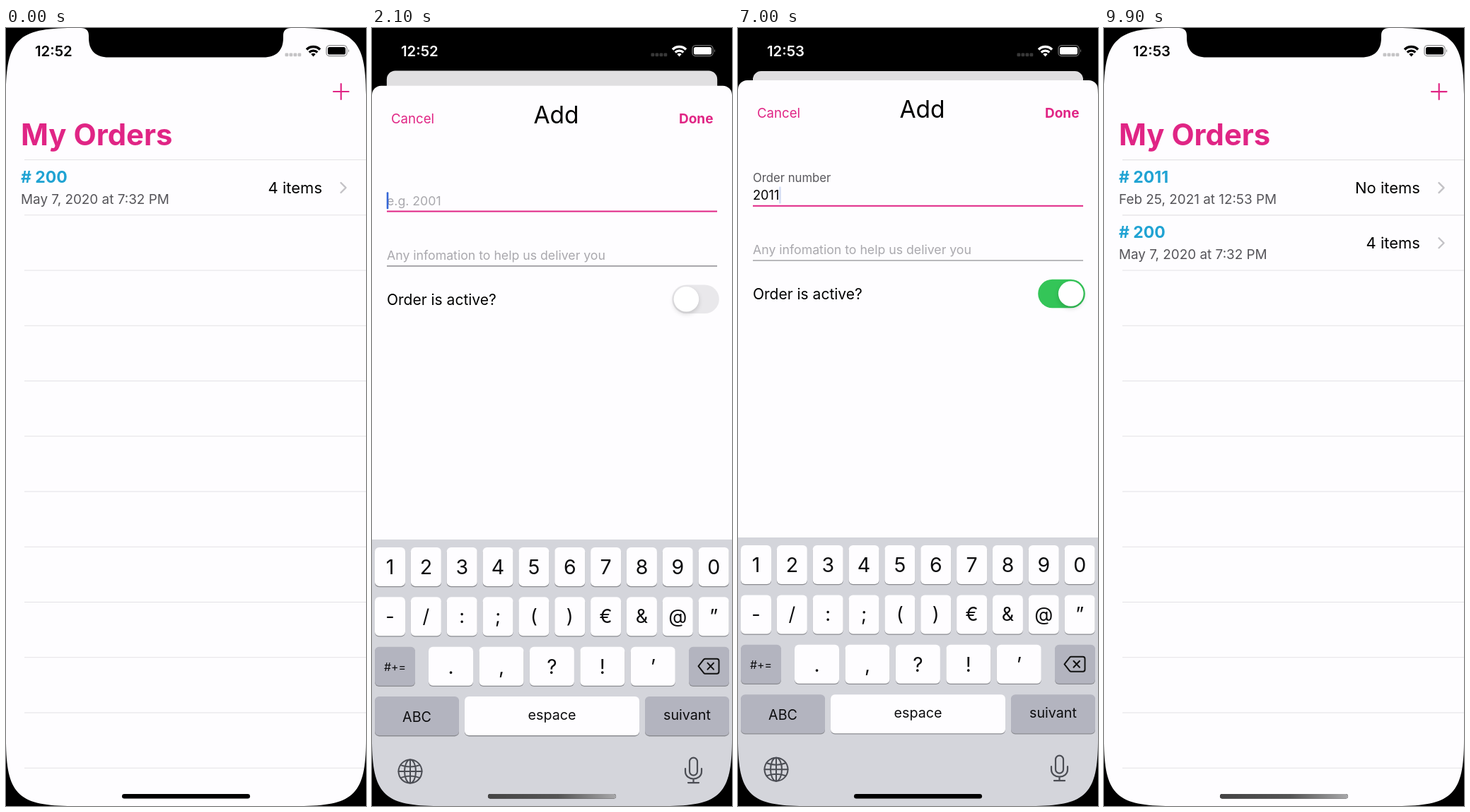
These frames come from a looping animation (509x1101 px, 9.95 s). An HTML page:

```html
<!DOCTYPE html>
<html lang="en">
<head>
<meta charset="utf-8">
<title>My Orders</title>
<style>
  html, body { margin: 0; width: 100%; height: 100%; overflow: hidden; background: #000; }
  svg { display: block; width: 100vw; height: 100vh; font-family: Inter, Roboto, sans-serif; }
  .mid { text-anchor: middle; }
  .end { text-anchor: end; }
  .pink { fill: #e02585; }
  .hint { fill: #a9a8ad; font-size: 17.7px; }
  .number { fill: #20a3d3; font-size: 23px; font-weight: 700; }
  .date { fill: #555459; font-size: 18.9px; }
  .line { fill: none; stroke-linecap: round; stroke-linejoin: round; }
  #thumb { filter: drop-shadow(0 3px 3px rgba(0, 0, 0, .16)); }
</style>
</head>
<body>
<svg viewBox="0 0 509 1101">
  <defs>
    <linearGradient id="fade"><stop stop-color="#444"/><stop offset=".55" stop-color="#555"/><stop offset="1" stop-color="#a8a8aa"/></linearGradient>
    <g id="globe" class="line" stroke="#4b4d54" stroke-width="2">
      <circle r="16.5"/><ellipse rx="8" ry="16.5"/>
      <path d="M0-16.5V16.5M-16.5 0H16.5M-13.5-9Q0-4 13.5-9M-13.5 9Q0 4 13.5 9"/>
    </g>
    <g id="mic" class="line" stroke="#4b4d54" stroke-width="2.2">
      <rect x="-5.5" y="-18.5" width="11" height="25" rx="5.5"/>
      <path d="M-11.5-3V1C-11.5 15 11.5 15 11.5 1V-3M0 11.5V17M-7.5 17H7.5"/>
    </g>
    <g id="delete" class="line" stroke="#111" stroke-width="2">
      <path d="M-5-10.5H11.5Q14.5-10.5 14.5-7.5V7.5Q14.5 10.5 11.5 10.5H-5Q-6 10.5-7 9.5L-14.5 0L-7-9.5Q-6-10.5-5-10.5ZM-1.5-4.500L7 4.500M7-4.500L-1.5 4.500"/>
    </g>
    <path id="shift" class="line" stroke="#111" stroke-width="2" d="M0-11L12 1H6V10H-6V1H-12Z"/>
  </defs>

  <rect width="509" height="1101"/>

  <g id="card">
    <rect id="page" width="509" height="1130" fill="#fefdff"/>
    <path id="plus" class="line" stroke-width="2.2" d="M463 90H484.500M473.700 79V101"/>
    <text class="pink" x="21" y="166" font-size="41.8" font-weight="700">My Orders</text>
    <path id="rules" stroke="#e3e2e5" stroke-width="1.2"/>
    <g id="newRow"></g>
    <g id="oldRow"></g>
    <rect id="scrim" width="509" height="1130"/>
  </g>

  <g id="sheet">
    <rect y="74" width="509" height="1100" rx="13" fill="#fefdff"/>
    <text class="pink" x="27" y="127" font-size="18.6">Cancel</text>
    <text class="mid" x="260.500" y="127" font-size="33.5">Add</text>
    <text id="done" class="pink end" x="482.500" y="127" font-size="19" font-weight="700">Done</text>
    <text id="label" x="21" y="218" font-size="16.7" fill="#58575c">Order number</text>
    <text id="example" class="hint" x="21" y="243">e.g. 2001</text>
    <text id="typed" x="21" y="243" font-size="18.2"></text>
    <g id="clear">
      <circle cx="470" cy="227.500" r="9.300" fill="#c6c5c9"/>
      <path class="line" stroke="#fff" stroke-width="1.8" d="M466.500 224L473.500 231M473.500 224L466.500 231"/>
    </g>
    <path id="underline1" d="M21 251.700H488"/>
    <text class="hint" x="21" y="320">Any infomation to help us deliver you</text>
    <path id="underline2" d="M21 329H488"/>
    <rect id="cursor" width="2.600" height="24" rx="1" fill="#3566d6"/>
    <text x="21" y="384" font-size="21">Order is active?</text>
    <rect id="track" x="424.200" y="355.800" width="66.600" height="40.400" rx="20.200"/>
    <rect id="thumb" y="358.200" height="35.600" rx="17.800" fill="#fff"/>
  </g>

  <g id="numeric"></g>
  <g id="letters"></g>

  <g id="status">
    <text id="clock" x="41" y="40" font-size="20.3" font-weight="600"></text>
    <g opacity=".22" id="signal"></g>
    <path d="M425 30.500A13.500 13.500 0 0 1 444 30.500" fill="none" stroke="currentColor" stroke-width="3.500"/>
    <path d="M428.700 34.500A8.300 8.300 0 0 1 440.300 34.500" fill="none" stroke="currentColor" stroke-width="3.200"/>
    <path d="M434.500 40.500L431.300 37A4.600 4.600 0 0 1 437.700 37Z"/>
    <rect x="453" y="24.700" width="29" height="15" rx="4.500" fill="none" stroke="currentColor" stroke-width="1.300" opacity=".45"/>
    <rect x="455" y="26.900" width="25" height="10.600" rx="2.600"/>
    <path d="M484 29.700Q486 32.200 484 34.800Z" opacity=".5"/>
  </g>

  <rect x="164" y="1084" width="181" height="6.500" rx="3.250"/>
  <rect id="homeFade" x="164" y="1084" width="181" height="6.500" rx="3.250" fill="url(#fade)"/>

  <path fill-rule="evenodd" d="M-2-2H511V1103H-2ZM0 94V1007C0 1084 17 1101 94 1101H415C492 1101 509 1084 509 1007V94C509 17 492 0 415 0H94C17 0 0 17 0 94Z"/>
  <path d="M106 0C114 0 117 4 117 11V14C117 32 127 41.500 145 41.500H364C382 41.500 392 32 392 14V11C392 4 395 0 403 0Z"/>
</svg>

<script>
const LOOP = 9950, STEP = 50, ROW = 78.25, PINK = [224, 37, 133];
const el = Object.fromEntries([...document.querySelectorAll('svg [id]')].map(n => [n.id, n]));

const clamp = v => Math.max(0, Math.min(1, v));
const ramp = (t, start, length) => clamp((t - start) / length);
const ease = v => v * v * (3 - 2 * v);
const mix = (a, b, k) => a + (b - a) * k;
const rgb = (a, b, k) => `rgb(${a.map((v, i) => Math.round(mix(v, b[i], k)))})`;
const set = (node, attrs) => { for (const k in attrs) node.setAttribute(k, attrs[k]); };
const move = (node, y) => set(node, { transform: `translate(0 ${y})` });
const show = (node, visible) => set(node, { visibility: visible ? 'visible' : 'hidden' });

// Critically damped spring from 0 to 1
const spring = ms => {
  const x = Math.max(0, ms) * 0.01826;
  return 1 - (1 + x) * Math.exp(-x);
};

// --- Static parts ---
const orderRow = (number, date, items) => `
  <text class="number" x="21" y="219"># ${number}</text>
  <text class="date" x="21" y="249">${date}</text>
  <text class="end" x="447" y="234" font-size="22">${items}</text>
  <path class="line" stroke="#c3c2c6" stroke-width="2.400" d="M473.500 219L480.500 226L473.500 233"/>`;

el.newRow.innerHTML = orderRow(2011, 'Feb 25, 2021 at 12:53 PM', 'No items');
el.oldRow.innerHTML = orderRow(200, 'May 7, 2020 at 7:32 PM', '4 items');
el.rules.setAttribute('d', Array.from({ length: 12 }, (_, i) => `M26 ${186.5 + i * ROW}H509`).join(''));
el.signal.innerHTML = [0, 1, 2, 3].map(i =>
  `<rect x="${394.5 + i * 6}" y="35.500" width="4.800" height="4.800" rx="1.200"/>`).join('');

const key = (x, y, w, label, size, baseline, fill = '#fefdff') => `
  <rect x="${x}" y="${y + 1.3}" width="${w}" height="55" rx="6" fill="#8b8c91"/>
  <rect x="${x}" y="${y}" width="${w}" height="55" rx="6" fill="${fill}"/>
  <text class="mid" x="${x + w / 2}" y="${y + baseline}" font-size="${size}" fill="#0c0c0e">${label}</text>`;
const modifier = (x, y, w, label, size, baseline) => key(x, y, w, label, size, baseline, '#b3b4bf');
const keyRow = (labels, x, y, w, pitch, size, baseline) =>
  [...labels].map((c, i) => key(x + i * pitch, y, w, c.replace('&', '&amp;'), size, baseline)).join('');
const icon = (id, x, y) => `<use href="#${id}" x="${x}" y="${y}"/>`;

const keyboard = (top, row1, row2, row3, left, right) => {
  const y = i => top + i * 70.4;
  return `<rect width="509" height="520" fill="#d4d5db"/>
    ${row1(y(0))}${row2(y(1))}${row3(y(2))}
    ${modifier(448, y(2), 57, '', 1, 0)}${icon('delete', 476, y(2) + 27.5)}
    ${modifier(4, y(3), 119, left, 19.7, 36)}
    ${key(131, y(3), 247, 'espace', 19.7, 32.5)}
    ${modifier(386, y(3), 119, right, 19.7, 32.5)}
    ${icon('globe', 54, y(3) + 106)}${icon('mic', 454.5, y(3) + 105)}`;
};

el.numeric.innerHTML = keyboard(11,
  y => keyRow('1234567890', 4, y, 43, 50.85, 28.5, 38),
  y => keyRow('-/:;()€&@”', 4, y, 43, 50.85, 27, 37),
  y => modifier(4, y, 57, '#+=', 15.8, 34) + keyRow('.,?!’', 80, y, 63, 71.45, 28, 38),
  'ABC', 'suivant');

const suggestion = (x, word, strength) => `
  <text class="mid" x="${x}" y="40" font-size="19.5" fill="#1c1c1f"><tspan
    class="first" data-strength="${strength}">${word[0]}</tspan><tspan
    class="rest">${word[1]}</tspan></text>`;

el.letters.innerHTML = keyboard(69,
  y => keyRow('azertyuiop', 4, y, 43, 50.85, 31, 34),
  y => keyRow('qsdfghjklm', 4, y, 43, 50.85, 31, 34),
  y => modifier(4, y, 57, '', 1, 0) + icon('shift', 32.5, y + 28) + keyRow('wxcvbn’', 80, y, 43, 50.85, 31, 34),
  '123', 'retour')
  + '<path stroke="#bcbdc3" stroke-width="1.300" d="M169 17V50M338.700 17V50"/>'
  + suggestion(83.5, 'je', .55) + suggestion(254, 'il', .35) + suggestion(424, 'le', .8);
const firstLetters = [...document.querySelectorAll('.first')];
const restLetters = [...document.querySelectorAll('.rest')];

// --- Timeline ---
const strokes = [3300, 3550, 3950, 4100];
const blinks = [ // time, opacity, fade length
  [0, 1, 1], [2600, 0, 150], [3249, 1, 1], [4550, 0, 200], [4900, 1, 200], [5400, 0, 200], [5750, 1, 200],
  [6250, 0, 200], [6600, 1, 200], [6850, 0, 190], [7099, 1, 1], [7450, 0, 200], [7800, 1, 200], [8399, 0, 1]
];
const cursorOpacity = t => {
  const i = blinks.findLastIndex(b => b[0] <= t);
  const [start, target, length] = blinks[i];
  return mix(i ? blinks[i - 1][1] : target, target, ramp(t, start, length));
};

const underline = (node, focused) =>
  set(node, { stroke: focused ? '#e02585' : '#77767b', 'stroke-width': focused ? 2 : 1.2 });

function render(t) {
  const p = t < 9000 ? spring(t - 1719) : 1 - spring(t - 9370);
  const focus = t < 7100 ? 1 : t < 8400 ? 2 : 0;

  // Order list, pushed back behind the sheet
  const scale = 1 - .0825 * p;
  const rx = mix(48, 13, p);
  set(el.card, { transform: `translate(${254.5 * (1 - scale)} ${61 * p}) scale(${scale})` });
  set(el.page, { rx });
  set(el.scrim, { rx, opacity: .12 * p });
  const press = ramp(t, 1500, 100) - ramp(t, 1700, 150);
  set(el.plus, { stroke: rgb(PINK, [152, 146, 152], clamp(p * 1.1)), opacity: 1 - .65 * press });
  show(el.newRow, t > 9000);
  move(el.oldRow, t > 9000 ? ROW : 0);

  // Form
  move(el.sheet, 1027 * (1 - p));
  set(el.done, { opacity: t >= 9000 && t < 9050 ? .35 : 1 });
  const count = strokes.filter(s => s <= t).length;
  el.typed.textContent = '2011'.slice(0, count);
  show(el.example, !count);
  const lift = ease(ramp(t, 3270, 230));
  set(el.label, { opacity: lift, y: mix(236, 218, lift) });
  show(el.clear, focus !== 1);
  underline(el.underline1, focus === 1);
  underline(el.underline2, focus === 2);
  const width = count && focus === 1 ? el.typed.getComputedTextLength() : 0;
  set(el.cursor, { x: 20.7 + width, y: focus === 2 ? 301.5 : 224.5, opacity: cursorOpacity(t) });

  const on = ease(ramp(t, 6000, 280));
  const grip = 8 * (ramp(t, 5850, 120) - ramp(t, 6120, 160));
  set(el.track, { fill: rgb([233, 232, 235], [52, 197, 88], on) });
  set(el.thumb, { x: mix(426.6, 452.9 - grip, on), width: 35.6 + grip });

  // Keyboards
  show(el.numeric, focus === 1);
  move(el.numeric, 721 + 380 * (1 - p));
  const hiding = t >= 8400;
  show(el.letters, focus === 2 || hiding);
  move(el.letters, 662 + 439 * (hiding ? spring(t - 8301) : 0));
  firstLetters.forEach(n => set(n, { 'fill-opacity': hiding ? n.dataset.strength : 1 }));
  restLetters.forEach(n => set(n, { 'fill-opacity': hiding ? .05 : 1 }));

  // Status bar and home indicator
  const tone = rgb([0, 0, 0], [255, 255, 255], p);
  set(el.status, { fill: tone, color: tone });
  el.clock.textContent = t < 2200 ? '12:52' : '12:53';
  set(el.homeFade, { opacity: ramp(t, 1650, 200) - ramp(t, 3300, 300) + ramp(t, 9400, 300) });
}

const frame = now => {
  render(Math.floor(now % LOOP / STEP) * STEP);
  requestAnimationFrame(frame);
};
render(0);
requestAnimationFrame(frame);
</script>
</body>
</html>
```
